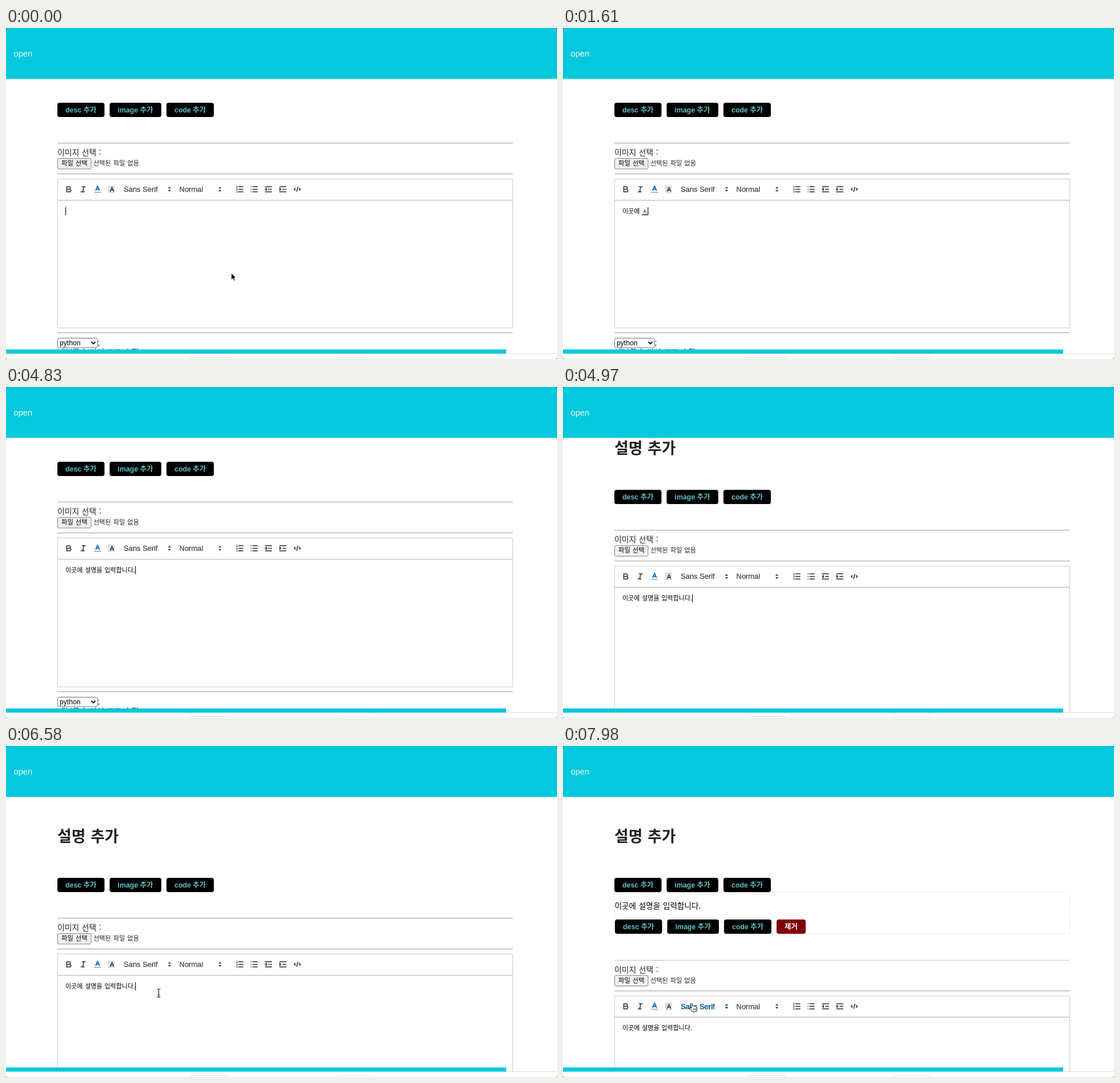
Write an HTML page that moves like this. It is 965x580 px and loops after 8000 ms.

```html
<!DOCTYPE html>
<html lang="ko">
<head>
<meta charset="utf-8">
<title>Editor</title>
<style>
  html, body { margin: 0; width: 100%; height: 100%; overflow: hidden; background: #fff; }
  svg { display: block; }
  text { font-family: "Liberation Sans", "Noto Sans CJK KR", "Noto Sans CJK JP", "Noto Sans CJK", sans-serif; white-space: pre; fill: #222; }
  .ko { font-family: "Noto Sans CJK KR", "Noto Sans CJK JP", "Noto Sans CJK", sans-serif; word-spacing: .9px; }
  .btn text { font-size: 12.4px; font-weight: 700; fill: #5fc0c8; }
  .pick { font-size: 12.9px; fill: #444; stroke: #444; stroke-width: .25px; }
  .icon { fill: none; stroke: #444; stroke-width: 2; stroke-linecap: round; stroke-linejoin: round; }
  .icon .full { fill: #444; }
  .icon .thin { stroke-width: 1; }
  .frame { fill: #fff; stroke: #ccc; }
  .hr { fill: #a9a9a9; }

  .anim { animation: 8s linear infinite; }
  .hard { animation-timing-function: step-end; }
  #page { animation-name: scroll; }
  #form { animation-name: push; }
  #item { animation-name: appear; }
  #hover { animation-name: hover; }
  #mouse { animation-name: move; }
  #arrow { animation-name: arrow; }
  #beam { animation-name: beam; }
  #hand { animation-name: hand; }

  @keyframes scroll {
    0%, 60.5% { transform: translateY(-100px); animation-timing-function: ease-in-out; }
    63.8%, 100% { transform: none; }
  }
  @keyframes push { 0% { transform: none; } 94.5%, 100% { transform: translateY(73.5px); } }
  @keyframes appear { 0% { visibility: hidden; } 94.5%, 100% { visibility: visible; } }
  @keyframes hover { 0% { visibility: hidden; } 98.8%, 100% { visibility: visible; } }
  @keyframes arrow { 0% { visibility: visible; } 7.8%, 100% { visibility: hidden; } }
  @keyframes beam { 0% { visibility: hidden; } 69.1% { visibility: visible; } 85.8%, 100% { visibility: hidden; } }
  @keyframes hand { 0% { visibility: hidden; } 85.8%, 100% { visibility: visible; } }
  @keyframes move {
    0%, 69.1% { transform: translate(345px, 480px); }
    72%, 78% { transform: translate(337px, 473px); animation-timing-function: ease-in-out; }
    87.5% { transform: translate(168px, 375px); }
    91% { transform: translate(162px, 296px); }
    92.8%, 94.8% { transform: translate(136px, 250px); animation-timing-function: ease-in-out; }
    99.2%, 100% { transform: translate(228px, 458px); }
  }
</style>
</head>
<body>
<svg width="965" height="580" viewBox="0 0 965 580">
  <defs>
    <g id="trio" class="btn">
      <rect x="90" y="231" width="82.5" height="25" rx="4"/>
      <rect x="181.5" y="231" width="90.5" height="25" rx="4"/>
      <rect x="281" y="231" width="83" height="25" rx="4"/>
      <text x="104" y="247.7">desc 추가</text>
      <text x="195.5" y="247.7">image 추가</text>
      <text x="295" y="247.7">code 추가</text>
    </g>
    <path id="updown" d="M7 11L9 13 11 11ZM7 7L9 5 11 7Z"/>
    <path id="lines" d="M7 4H15M7 9H15M7 14H15"/>
    <path id="margin" d="M3 4H15M9 9H15M3 14H15"/>
  </defs>

  <g id="page" class="anim">
    <text class="ko" x="90" y="167.5" font-size="26.8" font-weight="700" style="word-spacing:1.4px">설명 추가</text>
    <use href="#trio"/>

    <g id="item" class="anim hard">
      <rect x="90.5" y="256.5" width="797" height="72.5" fill="none" stroke="#e2e2e2" stroke-dasharray="3 2"/>
      <text class="ko" x="90.5" y="284.7" font-size="13.6" style="fill:#000">이곳에 설명을 입력합니다.</text>
      <use href="#trio" x="1" y="73"/>
      <g class="btn">
        <rect x="374" y="304" width="51" height="25" rx="4" fill="#800000"/>
        <text x="388" y="320.7" style="fill:#fff">제거</text>
      </g>
    </g>

    <g id="form" class="anim hard">
      <rect class="hr" x="90" y="301" width="797.5" height="1.2"/>
      <text class="ko" x="90" y="323" font-size="13.8">이미지 선택 :</text>
      <rect x="90.5" y="328.5" width="58.5" height="18.5" rx="2" fill="#efefef" stroke="#808080"/>
      <text class="ko" x="97" y="341" font-size="11.3" style="fill:#000">파일 선택</text>
      <text class="ko" x="153" y="341" font-size="11.2">선택된 파일 없음</text>
      <rect class="hr" x="90" y="355" width="797.5" height="1.2"/>

      <rect class="frame" x="90.5" y="364.5" width="797" height="37"/>
      <rect class="frame" x="90.5" y="402" width="797" height="223.5"/>
      <rect x="90" y="401" width="798" height="1.3" fill="#ccc"/>

      <g class="icon" transform="translate(101.9 374.5) scale(.9)">
        <path d="M5 4H9.5A2.5 2.5 0 0 1 9.5 9H5ZM5 9H10.5A2.5 2.5 0 0 1 10.5 14H5Z"/>
        <path transform="translate(28)" d="M7 4H13M5 14H11M8 14L10 4"/>
        <g transform="translate(56)" stroke="#06c">
          <path d="M3 15H15" opacity=".45"/>
          <path d="M5.5 11L9 3 12.5 11M11.63 9H6.38"/>
        </g>
        <g transform="translate(84)">
          <path d="M2.5 3H15.5M2.5 6H15.5M2.5 9H15.5M2.5 12H15.5M2.5 15H15.5" class="thin" stroke-dasharray="0.4 2.2"/>
          <path d="M5.5 13L9 5 12.5 13M11.6 11H6.4" stroke="#fff" stroke-width="3.5"/>
          <path d="M5.5 13L9 5 12.5 13M11.6 11H6.4"/>
        </g>
        <use href="#updown" class="full" x="196" stroke-width="1.2"/>
        <use href="#updown" class="full" x="294" stroke-width="1.2"/>
        <g transform="translate(332.8)">
          <use href="#lines"/>
          <path class="thin" d="M2.5 3L3.5 2.5V5.5M2.5 5.5H4.5M2.5 8Q4.5 7 4.3 8.4L2.5 10.3H4.6M2.5 12.6H4.3L3.4 13.8Q5 14 4.2 15.2L2.5 15.4"/>
        </g>
        <g transform="translate(360.7)">
          <path d="M6.5 4H15M6.5 9H15M6.5 14H15M3 4H3.01M3 9H3.01M3 14H3.01"/>
        </g>
        <g transform="translate(388.5)">
          <use href="#margin"/><path class="full" d="M5 7V11L3 9Z"/>
        </g>
        <g transform="translate(416.5)">
          <use href="#margin"/><path class="full" d="M3 7V11L5 9Z"/>
        </g>
        <path transform="translate(444.6)" d="M5 7L3 9 5 11M13 7L15 9 13 11M10 5L8 13"/>
      </g>
      <text class="pick" x="206.2" y="387">Sans Serif</text>
      <text class="pick" x="303.6" y="387">Normal</text>
      <g id="hover" class="anim hard">
        <text class="pick" x="206.2" y="387" style="fill:#06a;stroke:#06a">Sans Serif</text>
        <use href="#updown" transform="translate(278.3 374.5) scale(.9)" fill="#06a" stroke="#06a" stroke-width="1.2"/>
      </g>

      <text id="typed" class="ko" x="104" y="424.6" font-size="11" style="word-spacing:.8px;fill:#000"></text>
      <rect id="under" y="426.6" height="1.3"/>
      <rect id="caret" y="414" width="1.1" height="14"/>

      <rect class="hr" x="90" y="633.3" width="797.5" height="1.2"/>
      <rect x="90.5" y="643.5" width="70" height="16.5" rx="3" fill="#fff" stroke="#707070"/>
      <text x="94" y="656" font-size="12.2" style="fill:#000">python</text>
      <path d="M149.5 650L153 653.5 156.5 650" fill="none" stroke="#000" stroke-width="1.8"/>
      <text x="160.5" y="656" font-size="14.4">;</text>
      <text class="ko" x="91" y="672.5" font-size="13.8">내부를 눌러서 코드 수정</text>
    </g>
  </g>

  <rect width="965" height="89" fill="#04c8dc"/>
  <rect y="89" width="965" height="1" fill="#b8eff5"/>
  <text x="13.6" y="49.6" font-size="14.6" style="fill:#f2fdfe">open</text>

  <rect y="570.5" width="965" height="10" fill="#fff"/>
  <rect y="570" width="965" height="1" fill="#e0e0e0"/>
  <rect y="563.3" width="876" height="7.2" fill="#04c8dc"/>
  <g fill="none" stroke="#ddd">
    <rect x="322.5" y="577.5" width="69" height="20" rx="5"/>
    <rect x="577.5" y="577.8" width="68" height="20" rx="5" stroke="#eaeaea"/>
  </g>
  <path d="M0 0H3Q.6.6 0 3ZM965 0H962Q964.4.6 965 3ZM0 580H2L0 578ZM965 580H963L965 578Z" fill="#567"/>

  <path id="arrow" class="anim hard" transform="translate(394.6 429.6)" d="M0 0V11.6L2.7 9.1 4.6 13.4 6.6 12.5 4.7 8.3H8.3Z" stroke="#fff" stroke-width=".8"/>
  <g id="mouse" class="anim">
    <path id="beam" class="anim hard" d="M-3 -7Q0 -7 0 -5Q0 -7 3 -7M0 -5V5.5M-3 7.5Q0 7.5 0 5.5Q0 7.5 3 7.5M-1.5 2.5H1.5" fill="none" stroke="#111" stroke-width="1.2"/>
    <g id="hand" class="anim hard" fill="#fff" stroke="#111" stroke-linejoin="round">
      <path d="M-2.6 1.5L-4.4 -5.5Q-4.6 -7.2 -3.2 -7.3Q-2.2 -7.2 -1.8 -6L-.8 -2.4Q.6 -3.6 1.6 -2Q3 -2.8 3.9 -1.3Q5.6 -1.7 6 .2L6.5 3Q6.6 5 5.5 7.5L-1.6 8Q-2.8 5 -6 2.2Q-6.6 .6 -5 .3Q-3.8 .4 -2.6 1.5Z"/>
      <path d="M0 2.2L.7 5.4M2.1 2L2.7 5.2M4.1 1.8L4.6 5" stroke-width=".8"/>
    </g>
  </g>
</svg>
<script>
  const LOOP = 8000, BLUR = 7500, LEFT = 104;
  const PHRASE = "이곳에 설명을 입력합니다.";
  // key presses: time, finished characters, syllable being composed
  const KEYS = [
    [-370, 0, ""], [770, 0, "ㅇ"], [910, 0, "이"], [1050, 0, "익"], [1120, 1, "고"], [1190, 1, "곳"],
    [1330, 2, "ㅇ"], [1400, 2, "에"], [1470, 4, ""], [1540, 4, "ㅅ"], [1820, 4, "서"], [1960, 4, "설"],
    [2100, 5, "ㅁ"], [2240, 5, "며"], [2380, 5, "명"], [2450, 6, "ㅇ"], [2590, 6, "으"], [2660, 6, "을"],
    [2730, 8, ""], [2800, 8, "ㅇ"], [2870, 8, "이"], [2940, 8, "입"], [3080, 9, "ㄹ"], [3150, 9, "려"],
    [3290, 9, "력"], [3430, 10, "ㅎ"], [3500, 10, "하"], [3640, 10, "합"], [3710, 11, "ㄴ"], [3780, 11, "니"],
    [3850, 11, "닏"], [4060, 12, "다"], [4480, 14, ""]
  ];
  const [typed, under, caret] = ["typed", "under", "caret"].map(id => document.getElementById(id));

  function draw(now) {
    const t = now % LOOP;
    const [time, done, syllable] = KEYS.findLast(key => key[0] <= t);
    const text = PHRASE.slice(0, done) + syllable;
    if (typed.textContent !== text) typed.textContent = text;

    const end = LEFT + (text ? typed.getComputedTextLength() : 0);
    const width = syllable ? typed.getSubStringLength(done, 1) : 0;
    under.setAttribute("x", end - width);
    under.setAttribute("width", width);
    caret.setAttribute("x", end);
    const lit = t < BLUR && Math.floor((t - time) / 500) % 2 === 0;
    caret.setAttribute("visibility", lit ? "visible" : "hidden");
  }

  const start = performance.now();
  (function tick() {
    draw(performance.now() - start);
    requestAnimationFrame(tick);
  })();
</script>
</body>
</html>
```
